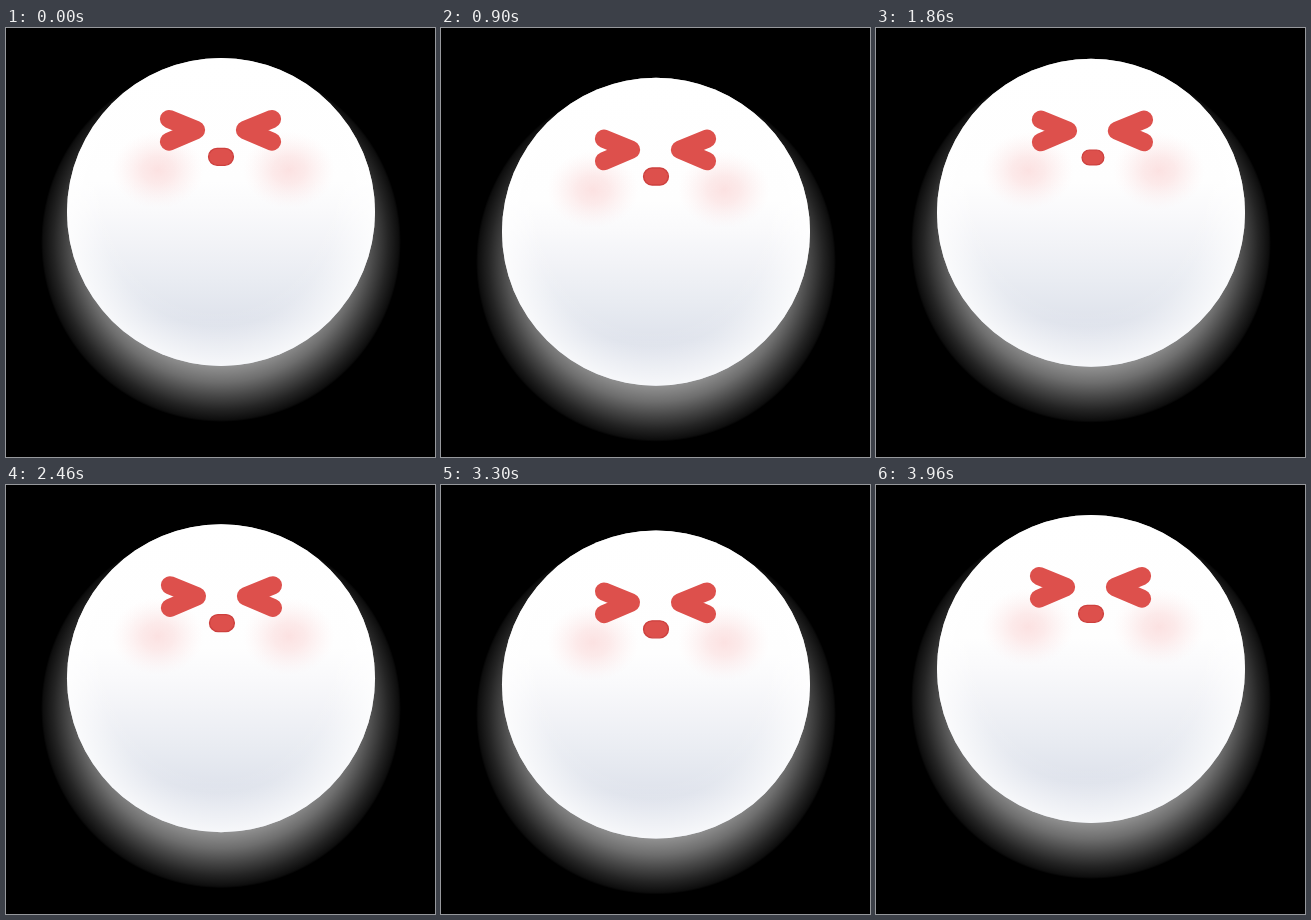
Animation of 429 by 429 pixels, one loop 4020 ms. Source, as an HTML page with a canvas:

```html
<!DOCTYPE html>
<html lang="en">
<head>
<meta charset="utf-8">
<title>Bobbing face</title>
<style>
  html, body { margin: 0; width: 100%; height: 100%; overflow: hidden; background: #000; }
  canvas { display: block; width: 100vw; height: 100vh; }
</style>
</head>
<body>
<canvas id="stage" width="429" height="429"></canvas>
<script>
const ctx = document.getElementById('stage').getContext('2d');
const LOOP = 4020, STEP = 60, BOB = LOOP / 2;
const R = 154, CX = 215, CY = 184;
const RED = '#dd504c', DARK_RED = '#cd403e';

const white = a => `rgba(255,255,255,${a})`;

function fillStops(gradient, stops) {
  for (const [at, color] of stops) gradient.addColorStop(at, color);
  return gradient;
}

function disc(x, y, r, fill) {
  ctx.fillStyle = fill;
  ctx.beginPath();
  ctx.arc(x, y, r, 0, Math.PI * 2);
  ctx.fill();
}

// Raised-cosine pulse: 1 at mid, 0 beyond the half width.
function pulse(t, mid, half) {
  const d = Math.abs(t - mid) / half;
  return d < 1 ? Math.cos(d * Math.PI / 2) ** 2 : 0;
}

// All parts are drawn around the ball's centre.
const glow = fillStops(ctx.createRadialGradient(0, 30, 110, 0, 30, 180), [
  [0, white(0.64)], [0.2, white(0.57)], [0.43, white(0.43)], [0.63, white(0.28)],
  [0.82, white(0.14)], [0.97, white(0.05)], [1, white(0)]
]);

const body = fillStops(ctx.createLinearGradient(0, -R, 0, R), [
  [0, '#ffffff'], [0.4, '#fefefe'], [0.5, '#f9f9fb'], [0.6, '#f2f3f7'],
  [0.72, '#e9ecf2'], [0.85, '#dfe3ec'], [1, '#dce0ea']
]);

const rim = fillStops(ctx.createRadialGradient(-4, -4, 102, 0, 0, R), [
  [0, white(0)], [0.3, white(0.08)], [0.65, white(0.43)], [1, white(0.76)]
]);

const blush = fillStops(ctx.createRadialGradient(0, 0, 0, 0, 0, 46), [
  [0, 'rgba(249,192,192,.46)'], [0.35, 'rgba(249,196,196,.35)'],
  [0.7, 'rgba(250,205,205,.15)'], [1, 'rgba(255,225,225,0)']
]);

function cheek(x) {
  ctx.save();
  ctx.translate(x, -42);
  ctx.scale(1, 0.84);
  disc(0, 0, 46, blush);
  ctx.restore();
}

function eye(x, side) {
  ctx.beginPath();
  ctx.moveTo(x, -93);
  ctx.lineTo(x + side * 27, -82);
  ctx.lineTo(x, -70.5);
  ctx.stroke();
}

function mouth(x, scale) {
  ctx.save();
  ctx.translate(x, -55.2);
  ctx.scale(scale, scale);
  ctx.beginPath();
  ctx.roundRect(-12.4, -8.5, 24.8, 17, 8.5);
  ctx.fillStyle = RED;
  ctx.fill();
  ctx.strokeStyle = DARK_RED;
  ctx.lineWidth = 1.4;
  ctx.stroke();
  ctx.restore();
}

function face(t) {
  const shift = 2.1 * pulse(t, 2010, 850);
  const pinch = 0.12 * pulse(t, 1890, 480);
  cheek(-63);
  cheek(68);
  ctx.strokeStyle = RED;
  ctx.lineWidth = 18.2;
  ctx.lineCap = ctx.lineJoin = 'round';
  eye(-52 + shift, 1);
  eye(51 + shift, -1);
  mouth(shift, 1 - pinch);
}

function draw(t) {
  const bob = 10 * (1 - Math.cos(2 * Math.PI * (t / BOB + 0.015)));
  ctx.fillStyle = '#000';
  ctx.fillRect(0, 0, 429, 429);
  ctx.save();
  ctx.translate(CX, CY + bob);
  disc(0, 30, 180, glow);
  disc(0, 0, R, body);
  disc(0, 0, R, rim);
  face(t);
  ctx.restore();
}

const start = performance.now();
function tick() {
  const t = (performance.now() - start) % LOOP;
  draw(Math.floor(t / STEP) * STEP);
  requestAnimationFrame(tick);
}
tick();
</script>
</body>
</html>
```
